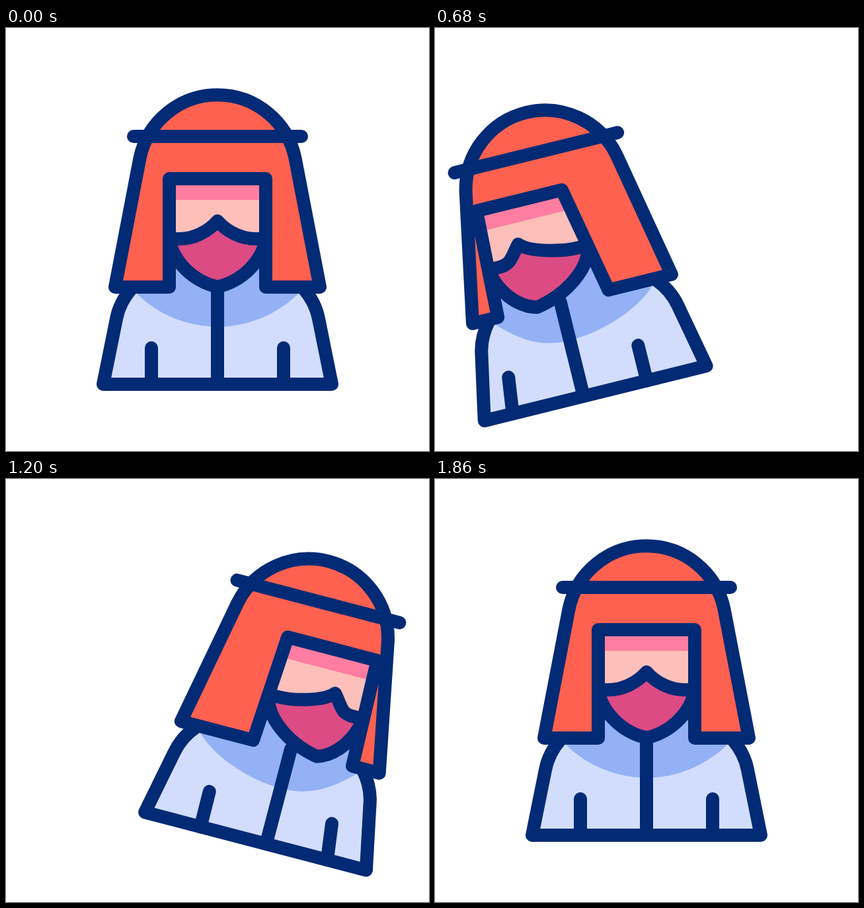
Recreate the animation shown at these times as an HTML page. Size 640 by 640 pixels, loop 2400 ms.

```html
<!DOCTYPE html>
<html lang="en">
<head>
<meta charset="utf-8">
<style>
  html, body { margin: 0; width: 100%; height: 100%; overflow: hidden; background: #fff; }
  svg { display: block; width: 100vw; height: 100vh; }
  .line { fill: none; stroke: #032a75; stroke-width: 20; stroke-linecap: round; stroke-linejoin: round; }
</style>
</head>
<body>
<svg viewBox="0 0 640 640">
  <g id="man">
    <path fill="#d2ddfd" d="M147 539L167 440C170 424 177 409 190 394H450C463 409 470 424 473 440L493 539Z"/>
    <path fill="#93b1f4" id="collar"/>
    <path class="line" d="M190 394C177 409 170 424 167 440L147 539H493L473 440C470 424 463 409 450 394"/>
    <path class="line" id="arms"/>
    <path fill="#ff7da0" id="brow"/>
    <path fill="#fdbfb9" id="skin"/>
    <path id="beard" class="line" style="fill:#dc4b84"/>
    <path class="line" id="zip"/>
    <path id="scarf" class="line" style="fill:#ff6150"/>
    <path class="line" d="M193 164H447"/>
  </g>
</svg>
<script>
const LOOP = 2400, STEP = 20, SPAN = 1850 / 3;

// x, y, angle, then sideways shifts: opening corners (tl tr bl br), moustache tip,
// chin, zip, left arm (top, bottom), right arm (top, bottom)
const rest = Array(14).fill(0);
const left = [-131, 18.5, -14, -36, -49, -43, -16.5, -60, -55, -18.5, -22, -29, -20, -20];
const right = [113.3, 15.3, 14.7, 42, 36, 31, 40, 60, 57, 16.5, 13.5, 14, 5, 12];

const moves = [
  { from: rest, to: left, ease: [0.9, 0.145], dip: -1.8 },
  { from: left, to: right, ease: [0.9, 0.1], dip: 10.3 },
  { from: right, to: rest, ease: [0.9, 0.09], dip: -3 }
];

const mix = (a, b, p) => a + (b - a) * p;
const set = (id, d) => document.getElementById(id).setAttribute("d", d);

// cubic-bezier(x1, 0, x2, 1)
function ease(u, [x1, x2]) {
  let lo = 0, hi = 1;
  for (let i = 0; i < 30; i++) {
    const t = (lo + hi) / 2, r = 1 - t;
    if (3 * r * r * t * x1 + 3 * r * t * t * x2 + t * t * t < u) lo = t;
    else hi = t;
  }
  return lo * lo * (3 - 2 * lo);
}

// height of the curved path, steep at both ends
function arch(p) {
  const s = 0.5 - Math.sin(Math.asin(1 - 2 * p) / 3);
  return 4 * s * (1 - s);
}

function draw(time) {
  const n = Math.min(2, Math.floor(time / SPAN));
  const move = moves[n];
  const p = ease(Math.min(1, time / SPAN - n), move.ease);
  const [x, y, angle, tl, tr, bl, br, tip, chin, zip, alt, alb, art, arb] =
    move.from.map((v, i) => mix(v, move.to[i], p));

  document.getElementById("man").setAttribute("transform",
    `translate(${320 + x} ${320 + y + move.dip * arch(p)}) rotate(${angle}) translate(-320 -320)`);

  const lx = h => 247 + mix(tl, bl, (h - 228) / 164);
  const rx = h => 393 + mix(tr, br, (h - 228) / 164);
  const slab = (a, b) => `M${lx(a)} ${a}H${rx(a)}L${rx(b)} ${b}H${lx(b)}Z`;
  const l = lx(319), r = rx(319), m = 320 + tip, c = 320 + chin, z = 320 + zip;

  set("brow", slab(228, 260));
  set("skin", slab(260, 321));
  set("beard", `M${l} 319h16C${l + 36} 319 ${m - 15} 309 ${m} 292
    C${m + 15} 309 ${r - 36} 319 ${r - 16} 319H${r}
    C${r - 5} 352 ${358 + (r - 393 + chin) / 2} 383 ${c} 391.5
    C${282 + (l - 247 + chin) / 2} 383 ${l + 5} 352 ${l} 319Z`);
  set("zip", `M${z} 391V539`);
  set("collar", `M199 403C231 434 ${z - 45} 452 ${z} 452S409 434 441 403L430 330H210Z`);
  set("arms", `M${220 + alt} 484L${220 + alb} 539M${420 + art} 484L${420 + arb} 539`);
  set("scarf", `M165 392L202.5 197A120 120 0 0 1 437.5 197L475 392
    H${393 + br}L${393 + tr} 228H${247 + tl}L${247 + bl} 392Z`);
}

const start = performance.now();
function tick() {
  const time = (performance.now() - start) % LOOP;
  draw(Math.floor(time / STEP) * STEP);
  requestAnimationFrame(tick);
}
tick();
</script>
</body>
</html>
```
